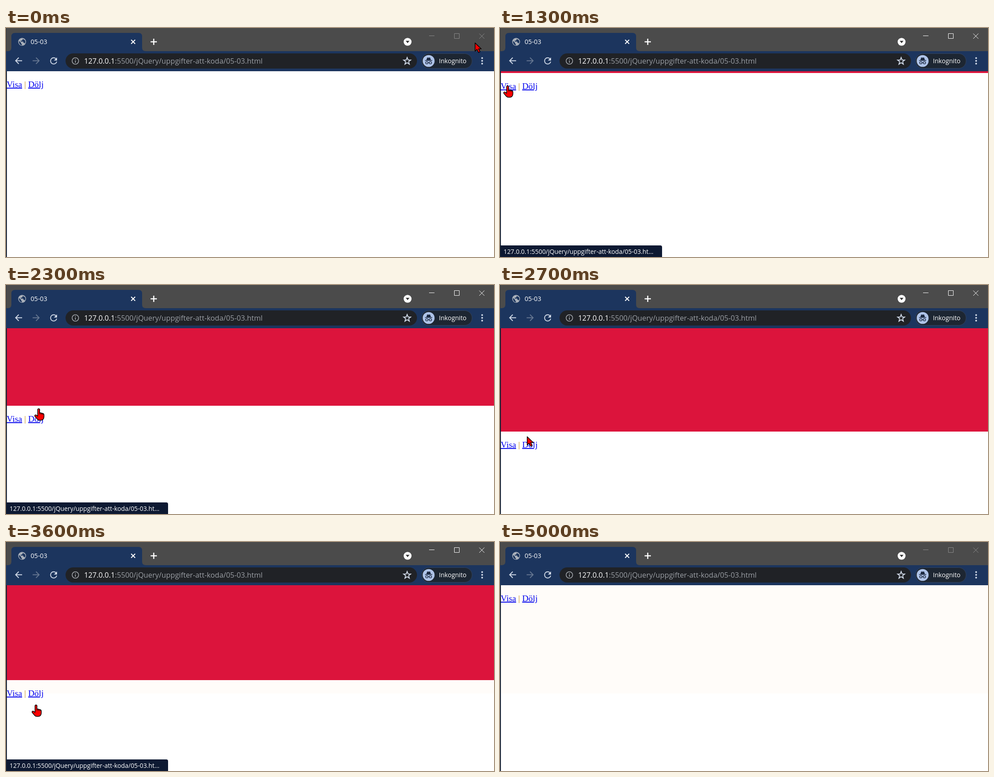
An HTML page that plays this animation: 1090x514 px, repeating every 5.1 s.

```html
<!DOCTYPE html>
<html lang="sv">
<head>
<meta charset="utf-8">
<title>05-03</title>
<style>
  html, body { margin: 0; width: 100%; height: 100%; overflow: hidden; background: #fff; }
  svg { display: block; width: 100vw; height: 100vh; }
  .ui { font-family: "Open Sans", "Noto Sans", sans-serif; fill: #fff; }
  .page { font: 19.4px "Liberation Serif", "Times New Roman", serif; white-space: pre; }
  .link { fill: #00e; text-decoration: underline; }
  .line { fill: none; stroke: #d0d9e7; stroke-width: 1.9; }
</style>
</head>
<body>
<svg viewBox="0 0 1090 514">
  <rect width="1090" height="514" fill="#fff"/>

  <!-- page -->
  <rect id="tint" x="2" y="97" width="1088" height="243" fill="#fffcf9"/>
  <rect id="bar" x="2" y="97" width="1088" fill="#dc143c"/>
  <text id="links" class="page" x="1.6"><tspan class="link">Visa</tspan><tspan fill="#c68f22"> | </tspan><tspan class="link">Dölj</tspan></text>

  <!-- window frame -->
  <rect width="1090" height="53" fill="#4b4b4b"/>
  <path d="M0 52H4Q12 52 12 44V19Q12 11 20 11H296Q304 11 304 19V44Q304 52 312 52H1090V97H0z" fill="#1c355e"/>
  <rect y="97" width="2" height="417" fill="#101c30"/>
  <rect width="1" height="52" fill="#2b3038"/>

  <!-- tab -->
  <circle cx="36" cy="31" r="8.7" fill="#a9b0ba"/>
  <path d="M29 29l4.5 4v1.5l2 2v2.2q-6-1-6.5-7zM37 24.5v2.2l-2 1.8h-2v2h5.5v2.5h2l1.5 2q2.5-4 0-8z" fill="#1c355e"/>
  <text class="ui" x="55" y="36" font-size="14.2">05-03</text>
  <path d="M279.5 26.5l9 9m0-9l-9 9" stroke="#fff" stroke-width="2"/>
  <path d="M323 31h14m-7-7v14" stroke="#fff" stroke-width="2.5"/>
  <circle cx="897" cy="31" r="8.8" fill="#fff"/>
  <path d="M892.8 28.8h8.4L897 34z" fill="#333"/>
  <path id="buttons" fill="none" d="M945 17.5h12M1001.5 12.5h11v11h-11zM1057 12.5l11.5 11.5m0-11.5l-11.5 11.5"/>

  <!-- toolbar -->
  <path class="line" d="M36 73.5H21.5m7-7l-7 7 7 7"/>
  <path class="line" style="stroke:#667791" d="M59.5 73.5H74m-7-7l7 7-7 7"/>
  <path class="line" d="M111.8 69.2A7 7 0 1 0 113.3 75.5"/>
  <path d="M114 66v7h-7z" fill="#d0d9e7"/>
  <rect x="133" y="57" width="785" height="34" rx="17" fill="#202226"/>
  <circle cx="155" cy="74" r="7.3" fill="none" stroke="#a3a7ad" stroke-width="1.6"/>
  <path d="M155 73v5M155 69.7v1.8" stroke="#a3a7ad" stroke-width="1.7"/>
  <text class="ui" x="174.5" y="80" font-size="16.27">127.0.0.1<tspan fill="#9a9ea4">:5500/jQuery/uppgifter-att-koda/05-03.html</tspan></text>
  <path id="star" class="line"/>
  <rect x="928.5" y="57.5" width="112.5" height="33" rx="16.5" fill="#1d2632" stroke="#35435a"/>
  <circle cx="944" cy="74" r="13.3" fill="#aec3e8"/>
  <path d="M936 73.5v-1.5h3l1.5-5q.3-1 1.3-.8l2.2.5 2.2-.5q1-.2 1.3.8l1.5 5h3v1.5z" fill="#1d2a42"/>
  <g fill="none" stroke="#1d2a42" stroke-width="1.4">
    <path d="M942.8 78q1.2-.8 2.4 0"/><circle cx="940" cy="78" r="2.6"/><circle cx="948" cy="78" r="2.6"/>
  </g>
  <text class="ui" x="967" y="79" font-size="14.1">Inkognito</text>
  <path d="M1063.5 67.5v0m0 6.2v0m0 6.3v0" stroke="#d0d9e7" stroke-width="4" stroke-linecap="round"/>

  <g id="status">
    <path d="M2 488H358q4 0 4 4V514H2z" fill="#0d1932"/>
    <text class="ui" x="8" y="507" font-size="13.88">127.0.0.1:5500/jQuery/uppgifter-att-koda/05-03.ht...</text>
  </g>

  <g id="cursor" fill="#f00" stroke="#000" stroke-width="1.5" stroke-linejoin="round">
    <path id="arrow" d="M.7 1.5V20l4.3-4 3.5 7 3.4-1.6-3.3-6.6H14.5z"/>
    <g id="hand">
      <path d="M-2.2 3a2.2 2.2 0 0 1 4.4 0V9.5l7 1.7q2.6.7 2.6 3.2v4.6q0 3-1.8 5.2-1.5 2.3-5.2 2.3H2q-3 0-4.8-2L-8.6 17.5q-.8-2.2 1.2-2.8 1.6-.4 3.2 1.2l2 1.4z"/>
      <path d="M2.2 9v4.5M5.5 10.5V14M8.6 11.5v3" fill="none" stroke-width="1.2"/>
    </g>
  </g>
</svg>
<script>
const $ = id => document.getElementById(id);
const set = (id, name, value) => $(id).setAttribute(name, value);
const show = (id, on) => set(id, 'display', on ? 'inline' : 'none');

const LOOP = 5100, STEP = 100, FULL = 243, FADE = 200;

const ramp = (t, start, length) => Math.min(1, Math.max(0, (t - start) / length));
const swing = p => .5 - Math.cos(p * Math.PI) / 2;
const easeOut = (p, power) => 1 - (1 - p) ** power;

const home = { x: 1047, y: 32 };
const moves = [
  { start: 0, length: 500, x: 20, y: 83, power: 2 },
  { start: 600, length: 400, x: 17, y: 129, power: 1 },
  { start: 1400, length: 500, x: 85, y: 215, power: 1 },
  { start: 1900, length: 800, x: 60, y: 339, power: 1 },
  { start: 2700, length: 300, x: 67, y: 365, power: 1 },
  { start: 4180, length: 420, x: 1057, y: 96, power: 2.4 }
];
// the pointer is over a link from..to
const hovers = [[900, 1600], [1700, 2300], [3000, 3850]];

function pointer(t) {
  let { x, y } = home;
  for (const m of moves) {
    const p = easeOut(ramp(t, m.start, m.length), m.power);
    x += (m.x - x) * p;
    y += (m.y - y) * p;
  }
  return `${Math.round(x)} ${Math.round(y)}`;
}

function draw(t) {
  const open = swing(ramp(t, 1155, 1785)) - swing(ramp(t, 3509, 400));
  const h = Math.round(FULL * open);
  set('bar', 'height', h);
  set('links', 'y', 133 + h);
  show('tint', t >= 3500);

  const hover = hovers.reduce((sum, [from, to]) => sum + ramp(t, from, FADE) - ramp(t, to, FADE), 0);
  set('status', 'opacity', hover);
  show('hand', hover > 0);
  show('arrow', hover <= 0);
  show('cursor', t < 4700);
  set('cursor', 'transform', `translate(${pointer(t)})`);
  set('buttons', 'stroke', t >= 1100 && t < 5000 ? '#fff' : '#8b8b8b');
}

const star = Array.from({ length: 10 }, (_, i) => {
  const r = i % 2 ? 3.5 : 8.3, a = (i / 5 - .5) * Math.PI;
  return `${(896 + r * Math.cos(a)).toFixed(1)} ${(74.5 + r * Math.sin(a)).toFixed(1)}`;
});
set('star', 'd', `M${star.join('L')}z`);

const start = performance.now();
function tick() {
  const t = (performance.now() - start) % LOOP;
  draw(Math.floor(t / STEP) * STEP);
  requestAnimationFrame(tick);
}
tick();
</script>
</body>
</html>
```
